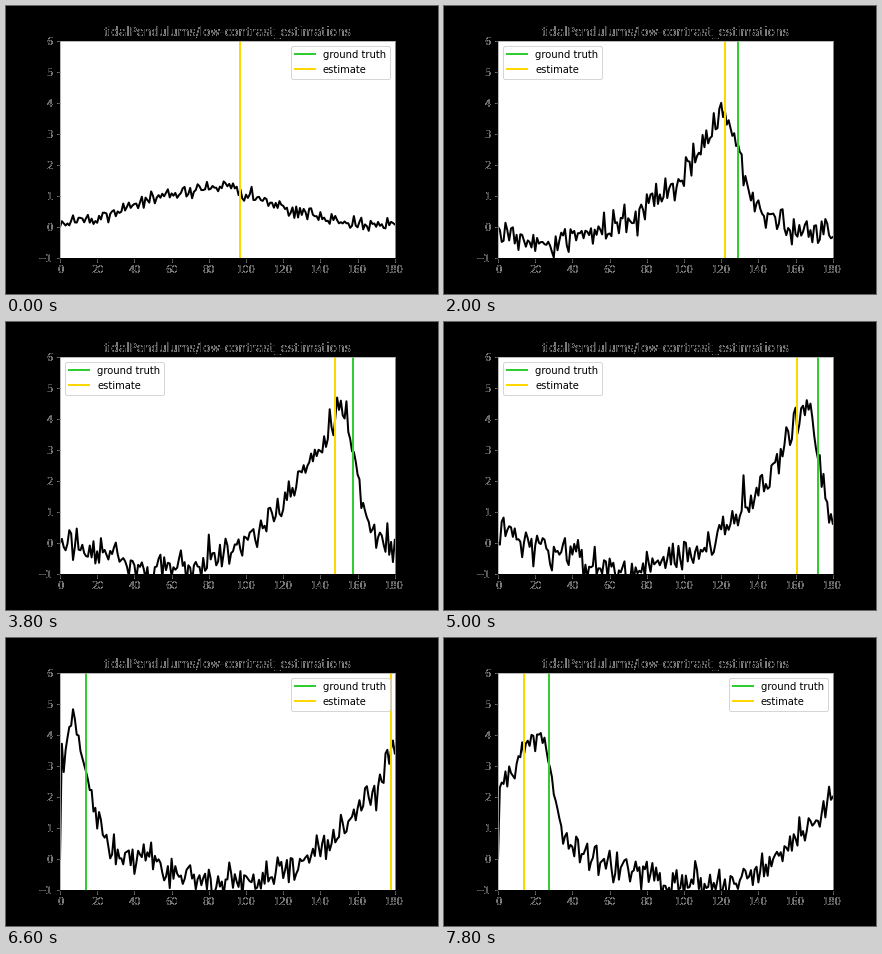
These frames come from a looping animation (432x288 px, 8000 ms). A matplotlib script:

```python
import numpy as np
import matplotlib.pyplot as plt
from matplotlib.animation import FuncAnimation

FRAMES, STEP_MS, SPAN = 40, 200, 180

# Headings at a few key frames, unwrapped past 180
KEYS = [0, 4, 10, 19, 25, 33, 39]
TRUTH = [97, 108.6, 129, 157.5, 172, 194, 207.4]
ESTIMATE = [97, 105, 122, 148, 161, 178, 194]

angles = np.arange(SPAN + 1)


def ramp(i, start, early, settled):
    """Quick growth at first, then a slower approach to the settled value."""
    return np.interp(i, [0, 4, 19], [start, early, settled])


def make_noise():
    """Noise that fades partly from one frame to the next."""
    rng = np.random.default_rng(7)
    rows = [rng.normal(size=angles.size)]
    for _ in range(FRAMES - 1):
        rows.append(.5 * rows[-1] + .87 * rng.normal(size=angles.size))
    return np.array(rows)


noise = make_noise()


def response(i, truth):
    """Slow rise and steep fall around a peak, on a wide wave."""
    peak = truth - 8
    d = (angles - peak + 100) % SPAN - 100
    rise = np.exp(np.minimum(d, 0) / ramp(i, 20, 22, 30))
    fall = np.exp(-(np.maximum(d, 0) / 12) ** 2)
    wave = np.cos(np.radians(2 * (d - ramp(i, -10, -4, 10))))
    y = ramp(i, .25, 2.7, 4.2) * rise * fall
    y += ramp(i, .6, .15, -.4) + ramp(i, .5, .4, .6) * wave
    y += ramp(i, .13, .25, .29) * noise[i]
    y[0] = 0
    return y


def fringe(image, dpi):
    """Black ink on black: only the soft edges show, as gray."""
    alpha = image[..., 3:]
    gray = 2 * alpha * (1 - alpha)
    return np.concatenate([gray, gray, gray, alpha > .1], axis=2), 0, 0


fig = plt.figure(figsize=(6, 4), dpi=72, facecolor="black")
ax = fig.add_axes([.125, .125, .775, .755])
ax.set(xlim=(0, SPAN), ylim=(-1, 6),
       xticks=range(0, SPAN + 1, 20), yticks=range(-1, 7))
ax.set_title("tidalPendulums/low-contrast_estimations", fontsize=12)
for part in (ax.title, ax.xaxis, ax.yaxis, ax.spines["bottom"]):
    part.set_agg_filter(fringe)
ax.spines[["left", "top", "right"]].set_color("0.65")

curve, = ax.plot(angles, np.zeros(angles.size), color="black", lw=2)
truth_line = ax.axvline(0, color="limegreen", lw=2, label="ground truth")
estimate_line = ax.axvline(0, color="gold", lw=2, label="estimate")
ax.legend(loc="best", fontsize=10)


def update(i):
    truth = np.interp(i, KEYS, TRUTH)
    estimate = np.round(np.interp(i, KEYS, ESTIMATE))
    curve.set_ydata(response(i, truth))
    truth_line.set_xdata([truth % SPAN] * 2)
    estimate_line.set_xdata([estimate % SPAN] * 2)
    return curve, truth_line, estimate_line


anim = FuncAnimation(fig, update, frames=FRAMES, interval=STEP_MS,
                     init_func=lambda: update(0), repeat=True, repeat_delay=0)
plt.show()
```
